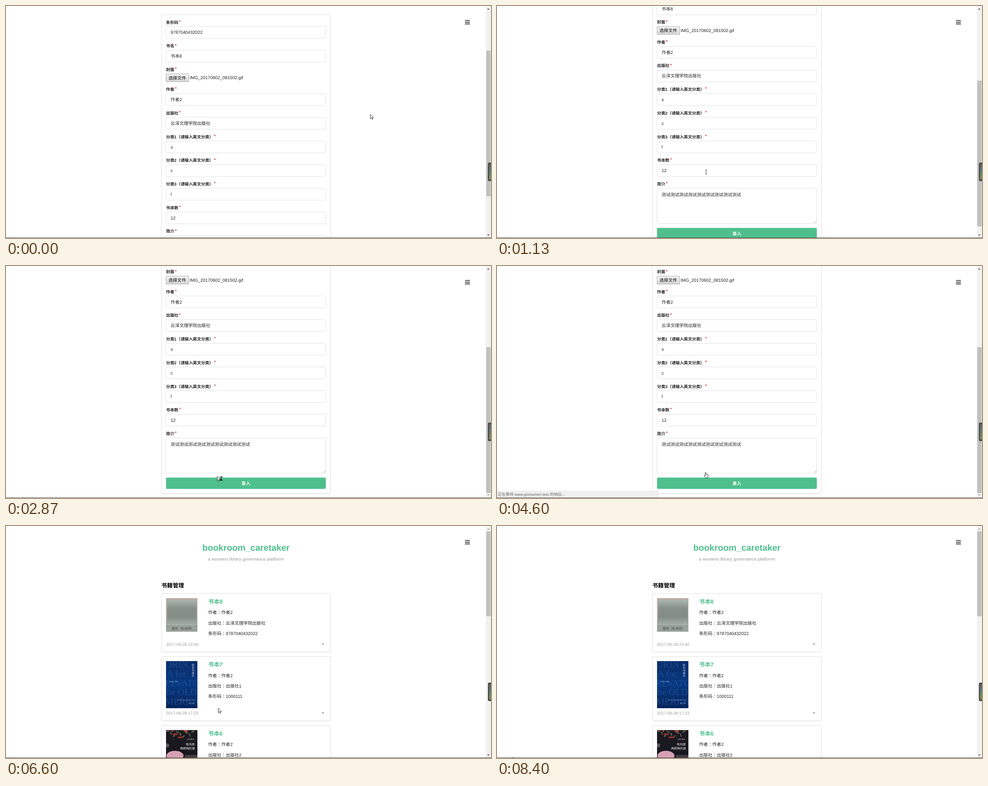
Write an HTML page with a canvas that moves like this. It is 1082 by 517 pixels and loops after 8.94 s.

```html
<!DOCTYPE html>
<html lang="zh-CN">
<head>
<meta charset="utf-8">
<title>Book form</title>
<style>
html, body { margin: 0; width: 100%; height: 100%; overflow: hidden; background: #fff; }
canvas { display: block; width: 1082px; height: 517px; }
</style>
</head>
<body>
<canvas id="stage" width="1082" height="517"></canvas>
<script>
const ctx = document.getElementById('stage').getContext('2d');
const W = 1082, H = 517, LOOP = 8940, TICK = 200 / 3;
const SANS = '"Liberation Sans", "Noto Sans CJK SC", "Noto Sans CJK", sans-serif';
const CENTRED = '"Noto Sans CJK TC", "Noto Sans CJK", sans-serif';
const SERIF = '"Liberation Serif", serif';
const GREEN = '#4fc08d', INK = '#212121', EM = 9.84, SMALL = 9.14, BIG = 12.65;
const PRESS = '云泽文理学院出版社', CODE = '9787040432022';
ctx.textRendering = 'geometricPrecision';

// Cursor path: [tick, x, y, shape, glide to next]
const path = [
  [0, 812.5, 241, 'arrow', 0],
  [8, 812.5, 241, 'arrow', 1],
  [10, 700, 262, 'beam', 1],
  [12, 545, 335, 'beam', 1],
  [14, 466.5, 369.5, 'beam', 0],
  [22, 466.5, 369.5, 'beam', 1],
  [27, 470, 452, 'beam', 1],
  [28, 471, 465, 'hand', 1],
  [30, 471.5, 469, 'hand', 0],
  [37, 471.5, 468.5, 'hand', 0],
  [38, 471, 468, 'hand', 0],
  [40, 471, 467.5, 'hand', 0],
  [43, 471, 468, 'busy', 0],
  [46, 471, 467.5, 'hand', 0],
  [51, 470.5, 467, 'hand', 0],
  [52, 470, 466, 'hand', 0],
  [57, 469.5, 465, 'hand', 0],
  [59, 469, 464, 'hand', 0],
  [61, 468.5, 462.5, 'hand', 0],
  [64, 468, 461.5, 'hand', 0],
  [66, 468, 461.5, 'hand', 1],
  [69, 465.5, 459.5, 'hand', 1],
  [71, 465, 458.5, 'hand', 0],
  [73, 462.5, 458, 'busy', 1],
  [77, 461.5, 457.2, 'busy', 0],
  [79, 461, 456.8, 'busy', 1],
  [82, 460, 456.3, 'busy', 0],
  [85, 460, 456, 'arrow', 0],
  [97, 460, 456, 'arrow', 1],
  [102, 493, 330, 'arrow', 1],
  [105, 468, 190, 'arrow', 1],
  [107, 405, 126, 'arrow', 1],
  [109, 375, 119, 'arrow', 1],
  [111, 446.5, 143.5, 'arrow', 0],
  [112, 446.5, 143.5, 'arrow', 1],
  [115, 474, 200, 'arrow', 1],
  [119, 390, 360, 'arrow', 1],
  [126, 35, 514.8, 'arrow', 0]
];

const ramp = (v, a, b) => {
  const p = Math.min(1, Math.max(0, (v - a) / (b - a)));
  return p * p * (3 - 2 * p);
};

// Full-width punctuation sits in the middle of its cell; returns the end x.
function text(s, x, y, size, color = INK, { bold = false, align = 'left', font = SANS } = {}) {
  ctx.textAlign = align;
  ctx.fillStyle = color;
  for (const part of s.split(/([：（）])/)) {
    const family = /^[：（）]$/.test(part) ? CENTRED : font;
    ctx.font = `${bold ? 'bold ' : ''}${size}px ${family}`;
    ctx.fillText(part, x, y);
    x += ctx.measureText(part).width;
  }
  return x;
}

function rect(x, y, w, h, color) {
  ctx.fillStyle = color;
  ctx.fillRect(x, y, w, h);
}

function box(x, y, w, h, r, fill, stroke) {
  ctx.beginPath();
  ctx.roundRect(x, y, w, h, r);
  ctx.fillStyle = fill;
  ctx.fill();
  if (!stroke) return;
  ctx.strokeStyle = stroke;
  ctx.lineWidth = 0.8;
  ctx.stroke();
}

function shape(points, color) {
  ctx.beginPath();
  points.forEach(([x, y]) => ctx.lineTo(x, y));
  ctx.closePath();
  ctx.fillStyle = color;
  ctx.fill();
}

function oval(x, y, rx, ry, color, turn = 0) {
  ctx.beginPath();
  ctx.ellipse(x, y, rx, ry, turn, 0, 7);
  ctx.fillStyle = color;
  ctx.fill();
}

function fade(y0, y1, ...colors) {
  const g = ctx.createLinearGradient(0, y0, 0, y1);
  colors.forEach((c, i) => g.addColorStop(i / (colors.length - 1), c));
  return g;
}

function card(y, h) {
  ctx.save();
  ctx.shadowColor = 'rgba(34,36,38,.14)';
  ctx.shadowBlur = 1.5;
  ctx.shadowOffsetY = 0.7;
  box(347, y, 376.7, h, 2.6, '#fff');
  ctx.restore();
  box(347, y, 376.7, h, 2.6, '#fff', '#d8d8d9');
}

function label(s, y) {
  const end = text(s, 357, y + 3.5, SMALL, INK, { bold: true });
  text('*', end + 1.8, y + 1.7, SMALL, '#db2828', { bold: true });
}

function field(name, value, y) {
  label(name, y);
  box(357, y + 9.7, 356.4, 26.5, 2.8, '#fff', '#dadada');
  text(value, 367.3, y + 26.4, EM);
}

function form(scroll) {
  ctx.save();
  ctx.translate(0, -scroll);
  card(19.4, 616);
  field('条形码', CODE, 36);
  field('书名', '书本8', 88.8);
  label('封面', 141.3);
  box(357.2, 151.2, 50.2, 17.5, 0.5, fade(151, 169, '#f5f5f5', '#d8d8d8'), '#939393');
  text('选择文件', 362.4, 163.7, EM, '#000');
  text('IMG_20170602_081502.gif', 409.8, 163.4, EM);
  field('作者', '作者2', 185.6);
  field('出版社', PRESS, 238.4);
  ['s', 'c', 'l'].forEach((v, i) =>
    field(`分类${i + 1}（请输入英文分类）`, v, 291.1 + i * 52.7));
  field('书本数', '12', 449.2);
  label('简介', 501.9);
  box(357, 511.6, 356.4, 78.6, 2.8, '#fff', '#dadada');
  text('测试'.repeat(9), 367.3, 529.7, EM);
  ctx.strokeStyle = '#888';
  ctx.lineWidth = 0.6;
  ctx.beginPath();
  for (const d of [2.5, 5]) {
    ctx.moveTo(712.6 - d, 589);
    ctx.lineTo(712.6, 589 - d);
  }
  ctx.stroke();
  box(357, 600, 356.6, 25.3, 2.8, GREEN);
  text('录入', 535.2, 616.1, EM, '#fff', { bold: true, align: 'center' });
  ctx.restore();
}

function clipped(y, h, draw) {
  ctx.save();
  ctx.beginPath();
  ctx.rect(357, y, 70, h);
  ctx.clip();
  draw();
  ctx.restore();
}

function labelPhoto() {
  rect(357, 160.5, 70, 75, fade(160, 236, '#bda8a2', '#b3a9a2', '#969e96'));
  rect(359.5, 163.5, 66, 58.5, fade(163, 222, '#adbab0', '#87918a', '#838d85', '#a6b3aa'));
  rect(357, 222, 70, 14, '#9aa39b');
  rect(357, 222, 70, 0.7, '#7d857e');
  text('定价  25.00元', 392, 231.2, 7.4, '#30332f', { align: 'center' });
}

function blueCover() {
  rect(357, 301, 70, 105, fade(301, 406, '#0b2d6b', '#06387f', '#08245b'));
  ['ORIN', 'A for', 'ELVATO', 'he OLD', 'MERIDI'].forEach((s, i) =>
    text(s, 355 + (i % 2) * 3, 315 + i * 20.8, 21, 'rgba(50,100,170,.5)', { font: SERIF }));
  [...'砂石与纸灯'].forEach((c, i) =>
    text(c, 417.5, 311.5 + i * 6, 5.8, '#e6ecf5', { align: 'center' }));
  text('Orven Tale', 364, 347.5, 4.4, '#c9d6ea', { font: SERIF });
  text('Sand, Stone and Paper Lamp', 420, 388.5, 3.4, '#b9c9e2', { align: 'right', font: SERIF });
  text('纸灯书房', 420, 395.5, 3, '#b9c9e2', { align: 'right' });
}

function nightCover() {
  rect(357, 454.5, 70, 63, fade(454, 517, '#1b1a20', '#17171f'));
  for (let i = 0; i < 9; i++)
    oval(361 + i * 7, 457 + (i * 5) % 13, 4, 1.3, i % 2 ? '#59604b' : '#716b50', i * 1.1);
  for (let i = 0; i < 15; i++)
    oval(371 + (i * 11) % 35, 457 + (i * 7) % 21, 1.7, 1.7, i % 3 ? '#a92f2c' : '#c84c3e');
  oval(360, 489, 4, 4.5, '#55565c');
  oval(377, 512, 19, 11, '#d6a0b2');
  rect(399, 510, 28, 8, '#443b43');
  text('文叶青禾', 411.5, 476.7, 4.2, '#c8c5c6', { align: 'center' });
  text('有风夜', 411, 488.5, 6.6, '#fff', { align: 'center' });
  text('两把椅在窗', 405, 498, 6.6, '#fff', { align: 'center' });
}

function book(y, h, n, press, code, date) {
  card(y, h);
  text(`书本${n}`, 451, y + 22.3, BIG, GREEN, { bold: true });
  ['作者：作者2', `出版社：${press}`, `条形码：${code}`].forEach((s, i) =>
    text(s, 451, y + 45.9 + i * 23.4, EM));
  const foot = y + h - 17;
  text(date, 357, foot + 3.4, SMALL, '#999');
  shape([[704.3, foot - 1.3], [709.7, foot - 1.3], [707, foot + 1.6]], '#858585');
}

function shelf() {
  text('bookroom_caretaker', 535.4, 54.6, 19.7, GREEN, { bold: true, align: 'center' });
  text('a wumeno library governance platforrm', 535.4, 77.1, EM, '#999', { align: 'center' });
  text('书籍管理', 346.6, 136.7, BIG, '#000', { bold: true });
  book(150.3, 130, 8, PRESS, CODE, '2017-06-28 23:40');
  book(290.7, 143.2, 7, '出版社1', '1000111', '2017-06-28 17:23');
  book(444.3, 143.2, 6, '出版社2', '1000110', '2017-06-28 17:20');
  clipped(160.5, 75, labelPhoto);
  clipped(301, 105, blueCover);
  clipped(454.5, 63, nightCover);
}

function chrome(top, size, atTop, atEnd) {
  for (const y of [31.5, 35.3, 39.1]) box(1023.8, y, 11.2, 1.6, 0.5, '#222');
  rect(1070.5, 0, 11.5, H, '#f1f1f1');
  rect(1071.3, top, 9.8, size, '#c1c1c1');
  shape([[1073.3, 8], [1078.7, 8], [1076, 5]], atTop ? '#a3a3a3' : '#505050');
  shape([[1073.3, 509], [1078.7, 509], [1076, 512]], atEnd ? '#a3a3a3' : '#505050');
  box(1075.6, 349.4, 9, 40.4, 2, '#4b4e51', '#3a3a3a');
  rect(1077.8, 353, 4.2, 33.5, '#64686b');
  rect(1078.6, 362, 2.4, 24, fade(362, 386, '#4c7f8f', '#6c9b59', '#a2a24c'));
}

function status(s, alpha) {
  ctx.globalAlpha = alpha;
  rect(0, 500.8, 360, 15.7, '#e2e2e2');
  rect(0, 501.3, 359.5, 15.2, '#f0f0f0');
  text(s, 1.6, 512.3, 8.77, '#666');
  ctx.globalAlpha = 1;
}

function outline(d) {
  const p = new Path2D(d);
  ctx.fillStyle = '#fff';
  ctx.fill(p);
  ctx.strokeStyle = '#111';
  ctx.lineWidth = 0.85;
  ctx.stroke(p);
}

const arrow = () => outline('M.3 .5V10.4L2.8 8.2L4.4 11.8L6 11.1L4.4 7.6H7.4Z');
const cursors = {
  arrow,
  busy() {
    arrow();
    outline('M7.2 2.2H11.2L9.2 5.8L11.2 9.4H7.2L9.2 5.8Z');
    rect(6.4, 1.4, 5.8, 1.3, '#111');
    rect(6.4, 8.9, 5.8, 1.3, '#111');
    shape([[7.6, 9], [10.8, 9], [9.2, 6.6]], '#111');
  },
  hand() {
    outline('M-1 1Q0-.4 1 1V4.8L4.6 5.4Q5.9 5.8 5.9 7.3L5.5 10L4.6 12.6H-.4L-2.6 8.8Q-3.4 7.2-2.3 6.9L-1 8Z');
    rect(0.8, 5, 0.5, 2, '#555');
    rect(2.6, 5.3, 0.5, 1.7, '#555');
    rect(4.2, 5.6, 0.5, 1.5, '#555');
  },
  beam() {
    rect(-0.4, -4.2, 0.9, 8.9, '#222');
    for (const y of [-4.8, 4.4]) rect(-1.9, y, 3.9, 0.8, '#333');
  }
};

function cursor(k) {
  let i = path.length - 1;
  while (path[i][0] > k) i--;
  let [t, x, y, kind, glide] = path[i];
  if (glide) {
    const [t2, x2, y2] = path[i + 1];
    const p = (k - t) / (t2 - t);
    x += (x2 - x) * p;
    y += (y2 - y) * p;
  }
  ctx.save();
  ctx.translate(x, y);
  cursors[kind]();
  ctx.restore();
}

function draw(ms) {
  const k = Math.floor((ms + 4) / TICK);
  rect(0, 0, W, H, '#fff');
  if (k < 85) {
    const scroll = 105.5 * ramp(k, 12, 17) + 23 * ramp(k, 18, 22);
    form(scroll);
    chrome(99.3 + scroll * 0.635, 325, false, scroll > 128);
  } else {
    shelf();
    chrome(12, k < 86 ? 190.4 : 189.2, true, false);
  }
  if (k >= 46 && k < 90)
    status(k < 51 ? '正在连接...' : '正在等待 www.gomumen.test 的响应...', Math.min(1, (90 - k) / 4));
  cursor(k);
  rect(0, 516, W, 1, '#4a4a4a');
}

const start = performance.now();
function frame() {
  draw((performance.now() - start) % LOOP);
  requestAnimationFrame(frame);
}
frame();
</script>
</body>
</html>
```
